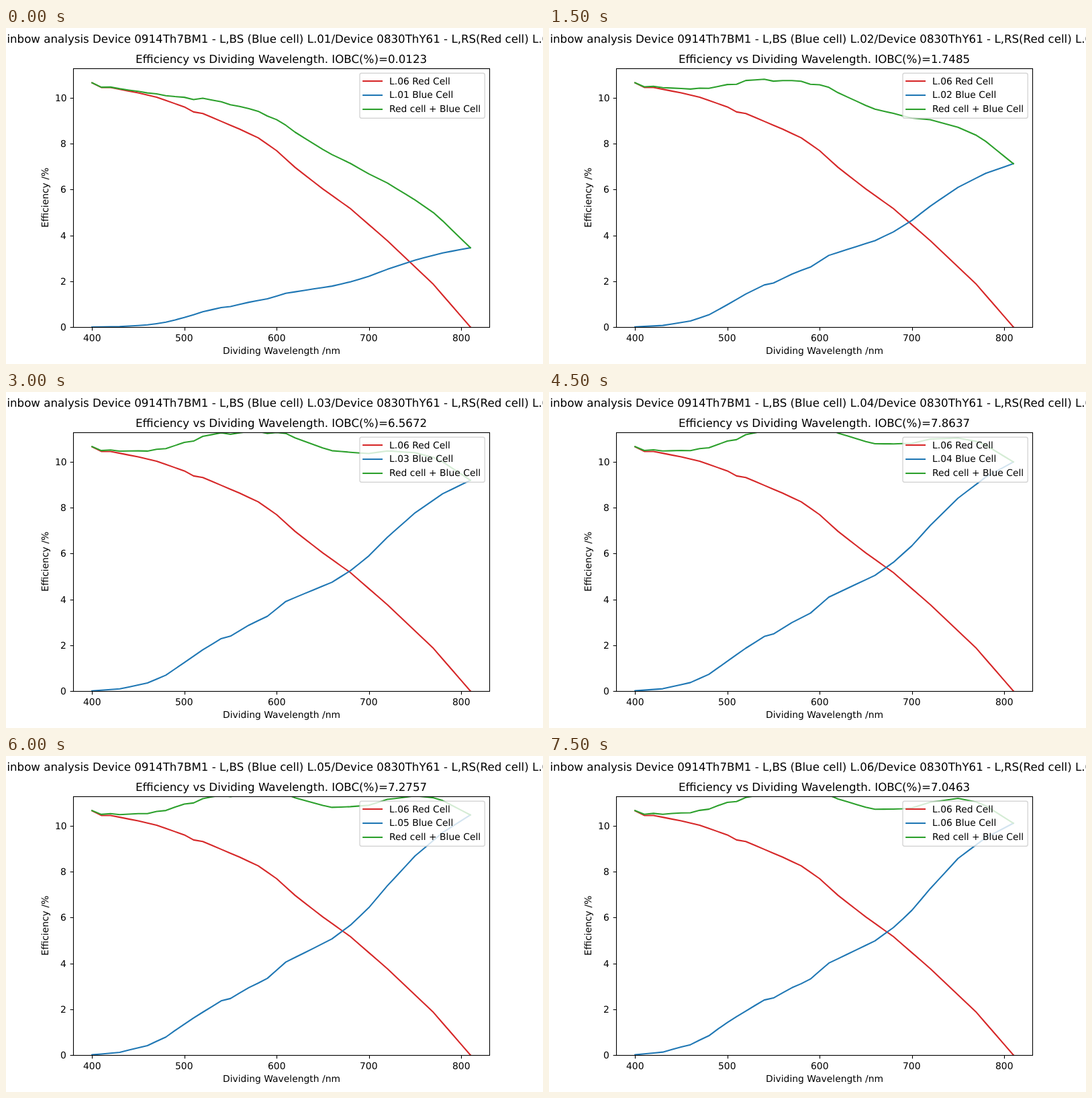
Animation of 800x500 px, one loop 8 s. Source, as an HTML page:

```html
<!DOCTYPE html>
<html lang="en">
<head>
<meta charset="utf-8">
<title>Efficiency vs Dividing Wavelength</title>
<style>
  html, body { margin: 0; width: 100%; height: 100%; overflow: hidden; background: #fff; }
  svg { display: block; width: 800px; height: 500px; }
  text { font: 13.889px "DejaVu Sans", sans-serif; text-rendering: geometricPrecision; white-space: pre; }
  .title { font-size: 16.667px; }
  .curve { fill: none; stroke-width: 2.083; stroke-linejoin: round; stroke-linecap: square; }
  .axis { fill: none; stroke: #000; stroke-width: 1.11; }
</style>
</head>
<body>
<svg id="chart" viewBox="0 0 800 500">
  <clipPath id="plot"><rect x="100" y="60" width="621" height="386"/></clipPath>
</svg>
<script>
const STEP_MS = 1500, LOOP_MS = 8000;
const RED = '#d62728', BLUE = '#1f77b4', GREEN = '#2ca02c';
const LEFT = 0, CENTER = 0.5, RIGHT = 1;

// Bends of the curves as [wavelength, efficiency].
const redBends = [
  [400, 10.66], [410, 10.46], [420, 10.46], [450, 10.22], [470, 10.03], [500, 9.61],
  [510, 9.39], [520, 9.32], [560, 8.64], [580, 8.26], [600, 7.7], [620, 6.97],
  [650, 6.03], [680, 5.17], [720, 3.77], [770, 1.86], [810, 0]];
const blueBends = [
  [400, 0.01], [430, 0.1], [460, 0.37], [480, 0.73], [520, 1.87], [540, 2.38],
  [550, 2.49], [570, 2.99], [590, 3.4], [610, 4.1], [660, 5.05], [680, 5.62],
  [700, 6.34], [720, 7.23], [750, 8.42], [780, 9.34], [810, 10]];

// Each blue cell scales the common blue curve by a gain that drifts with wavelength.
const gainNm = [440, 520, 580, 690, 750, 810];
const cells = [
  { iobc: '0.0123', gain: [0.22, 0.356, 0.363, 0.35, 0.347, 0.346] },
  { iobc: '1.7485', gain: [0.69, 0.771, 0.773, 0.736, 0.724, 0.713] },
  { iobc: '6.5672', gain: [0.94, 0.962, 0.962, 0.932, 0.924, 0.92] },
  { iobc: '7.8637', gain: [1, 1, 1, 1, 1, 1] },
  { iobc: '7.2757', gain: [1.15, 1, 0.982, 1.012, 1.032, 1.048] },
  { iobc: '7.0463', gain: [1.28, 1.027, 0.974, 0.992, 1.019, 1.012] }];

function interpolate(bends, x) {
  const next = bends.findIndex(bend => bend[0] >= x);
  if (next === 0) return bends[0][1];
  const [x0, y0] = bends[next - 1], [x1, y1] = bends[next];
  return y0 + (y1 - y0) * (x - x0) / (x1 - x0);
}

const svg = document.getElementById('chart');
const xAt = nm => 128.18 + (nm - 400) * 1.37472;
const yAt = value => 445 - value * 34.09;
const snap = v => Math.round(v) + 0.5;

function add(tag, attributes) {
  const node = document.createElementNS('http://www.w3.org/2000/svg', tag);
  for (const [name, value] of Object.entries(attributes)) node.setAttribute(name, value);
  return svg.appendChild(node);
}

// Text starts on whole pixels, whatever its alignment.
function write(node, x, align, content) {
  node.textContent = content;
  node.setAttribute('x', Math.round(x - align * node.getComputedTextLength()));
}
function label(x, y, align, content, attributes = {}) {
  const node = add('text', { y, ...attributes });
  write(node, x, align, content);
  return node;
}

const curve = color => add('polyline', { class: 'curve', stroke: color, 'clip-path': 'url(#plot)' });
function plot(line, efficiency) {
  const points = [];
  for (let nm = 400; nm <= 810; nm += 10) points.push(`${xAt(nm)},${yAt(efficiency(nm))}`);
  line.setAttribute('points', points.join(' '));
}

const red = nm => interpolate(redBends, nm);
const redLine = curve(RED), blueLine = curve(BLUE), greenLine = curve(GREEN);
plot(redLine, red);

add('rect', { class: 'axis', x: 100.5, y: 60.5, width: 620, height: 385 });
for (let nm = 400; nm <= 800; nm += 100) {
  add('path', { class: 'axis', d: `M${snap(xAt(nm))} 445.5v4.86` });
  label(xAt(nm), 466, CENTER, nm);
}
for (let value = 0; value <= 10; value += 2) {
  add('path', { class: 'axis', d: `M100.5 ${snap(yAt(value))}h-4.86` });
  label(90.28, Math.round(yAt(value) + 5), RIGHT, value);
}
label(410, 485, CENTER, 'Dividing Wavelength /nm');
label(-252.5, 63, CENTER, 'Efficiency /%', { transform: 'rotate(-90)' });

const heading = label(400, 22, CENTER, '', { class: 'title' });
const title = label(410, 52, CENTER, '', { class: 'title' });

add('rect', { x: 527, y: 67.3, width: 186.3, height: 67, rx: 2.8,
  fill: '#fff', stroke: '#ccc', 'stroke-width': 1.39, opacity: 0.8 });
function legend(lineY, textY, color, content) {
  add('path', { class: 'curve', stroke: color, d: `M532.2 ${lineY}h27.8` });
  return label(571, textY, LEFT, content);
}
legend(79, 84, RED, 'L.06 Red Cell');
const blueName = legend(100, 104, BLUE, '');
legend(121, 125, GREEN, 'Red cell + Blue Cell');

function show(step) {
  const { iobc, gain } = cells[step], name = `L.0${step + 1}`;
  const gainBends = gainNm.map((nm, i) => [nm, gain[i]]);
  const blue = nm => interpolate(blueBends, nm) * interpolate(gainBends, nm);
  plot(blueLine, blue);
  plot(greenLine, nm => red(nm) + blue(nm));
  write(heading, 400, CENTER,
    `Rainbow analysis Device 0914Th7BM1 - L,BS (Blue cell) ${name}/Device 0830ThY61 - L,RS(Red cell) L.06`);
  write(title, 410, CENTER, `Efficiency vs Dividing Wavelength. IOBC(%)=${iobc}`);
  write(blueName, 571, LEFT, `${name} Blue Cell`);
}

let shown = -1;
function draw() {
  const step = Math.floor((performance.now() % LOOP_MS) / STEP_MS);
  if (step !== shown) show(shown = step);
  requestAnimationFrame(draw);
}
draw();
</script>
</body>
</html>
```
